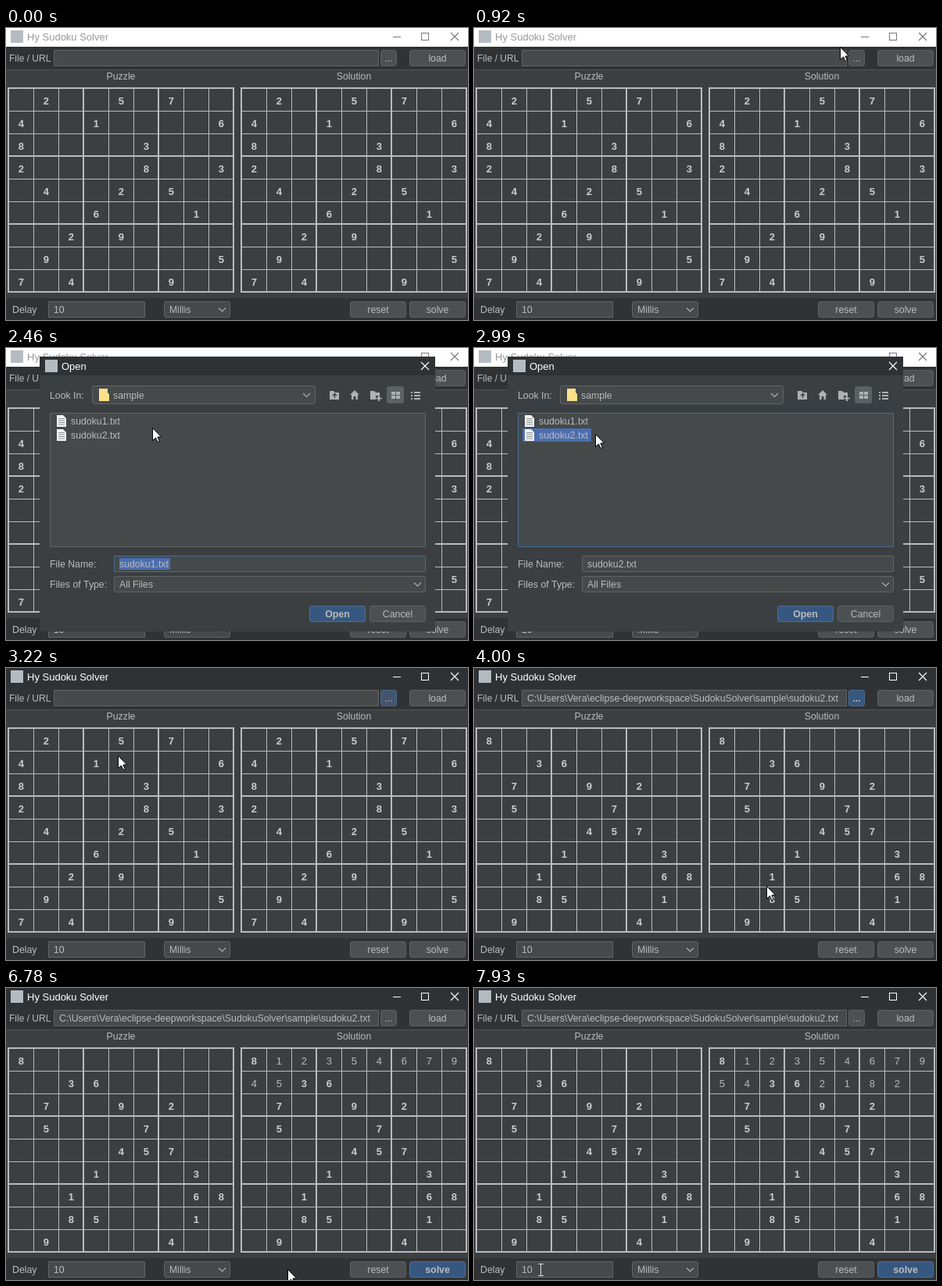
These frames come from a looping animation (591x374 px, 8000 ms). An HTML page with a canvas:

```html
<!DOCTYPE html>
<html lang="en">
<head>
<meta charset="utf-8">
<title>Sudoku solver</title>
<style>
html, body { margin: 0; width: 100%; height: 100%; overflow: hidden; background: #3c3f41; }
canvas { display: block; }
</style>
</head>
<body>
<canvas id="stage" width="591" height="374"></canvas>
<script>
const ctx = document.getElementById('stage').getContext('2d');
const LOOP = 8000;
const SANS = '"Liberation Sans", Arial, sans-serif';
const C = {
  bar: '#303234', panel: '#3c3f41', field: '#45494a', line: '#646464', text: '#bbbbbb',
  button: '#4c5052', edge: '#5e6060', hover: '#55595c', blue: '#365880', blueEdge: '#4c708c',
  focus: '#466d94', select: '#4b6eaf', icon: '#afb1b3', app: '#b4bcc2', title: '#2f3235'
};
const PATH = 'C:\\Users\\Vera\\eclipse-deepworkspace\\SudokuSolver\\sample\\sudoku2.txt';
const FIRST =
  '.2..5.7..' + '4..1....6' + '8....3...' + '2....8..3' + '.4..2.5..' +
  '...6...1.' + '..2.9....' + '.9......5' + '7.4...9..';
const SECOND =
  '8........' + '..36.....' + '.7..9.2..' + '.5...7...' + '....457..' +
  '...1...3.' + '..1....68' + '..85...1.' + '.9....4..';

// Key moments in ms
const T = { hover: 1150, press: 1380, open: 1700, pick: 2930, close: 3220, load: 3470,
            solveHover: 5550, solveFocus: 5700, solve: 5780, digits: 5930 };

// Cursor legs: start, end, steps, x, y, easing
const linear = f => f, easeIn = f => f * f, easeOut = f => f * (2 - f), smooth = f => f * f * (3 - 2 * f);
const LEGS = [
  [300, 300, 1, 398, 364, linear],
  [377, 685, 5, 438, 150, linear],
  [762, 916, 3, 468, 24, easeOut],
  [993, 1070, 2, 478, 35, linear],
  [1150, 1150, 1, 482, 36, linear],
  [2080, 2460, 6, 187, 102, smooth],
  [2630, 2780, 3, 169, 107, linear],
  [2930, 3070, 3, 143, 112, easeOut],
  [3470, 4000, 8, 374, 279, smooth],
  [4710, 4710, 1, 371, 280, linear],
  [5010, 5700, 10, 553, 356, smooth],
  [6325, 6710, 6, 420, 360, easeIn],
  [6780, 7550, 11, 76, 361, easeOut],
  [7630, 7780, 3, 85, 361, linear]
];

function cursorAt(t) {
  let x = 398, y = 364;
  for (const [t0, t1, n, tx, ty, ease] of LEGS) {
    if (t < t0) break;
    const k = n > 1 ? Math.floor((t - t0 + 0.5) * (n - 1) / (t1 - t0)) + 1 : 1;
    const f = ease(Math.min(1, k / n));
    x += (tx - x) * f;
    y += (ty - y) * f;
  }
  return [x, y];
}

// Board after each digit tried by the backtracking search
function trace(puzzle, limit) {
  const cells = [...puzzle], states = [puzzle];
  const fits = i => cells.every((v, j) => {
    if (j === i || v !== cells[i]) return true;
    const r = i / 9 | 0, c = i % 9, s = j / 9 | 0, d = j % 9;
    return r !== s && c !== d && ((r / 3 | 0) !== (s / 3 | 0) || (c / 3 | 0) !== (d / 3 | 0));
  });
  function search(i) {
    while (i < 81 && puzzle[i] !== '.') i++;
    if (i === 81) return true;
    for (let v = 1; v <= 9; v++) {
      cells[i] = String(v);
      states.push(cells.join(''));
      if (states.length > limit || (fits(i) && search(i + 1))) return true;
    }
    cells[i] = '.';
    return false;
  }
  search(0);
  return states;
}
const STATES = trace(SECOND, 104);

function solutionAt(t) {
  if (t < T.load) return FIRST;
  if (t < T.digits) return SECOND;
  const tick = 76.92;
  const shown = T.digits + Math.floor((t - T.digits + 1) / tick) * tick;
  return STATES[Math.min(104, Math.floor((shown - 5845) / 20))];
}

function rect(x, y, w, h, color) {
  ctx.fillStyle = color;
  ctx.fillRect(x, y, w, h);
}

function text(s, x, y, { size = 12.3, color = C.text, bold = false, align = 'left' } = {}) {
  ctx.font = (bold ? 'bold ' : '') + size + 'px ' + SANS;
  ctx.textAlign = align;
  ctx.fillStyle = color;
  ctx.fillText(s, x, y);
}

function stroke(color, width, ...lines) {
  ctx.strokeStyle = color;
  ctx.lineWidth = width;
  ctx.beginPath();
  for (const pts of lines)
    for (let i = 0; i < pts.length; i += 2) ctx[i ? 'lineTo' : 'moveTo'](pts[i], pts[i + 1]);
  ctx.stroke();
}

function polygon(color, ...pts) {
  ctx.fillStyle = color;
  ctx.beginPath();
  for (let i = 0; i < pts.length; i += 2) ctx.lineTo(pts[i], pts[i + 1]);
  ctx.closePath();
  ctx.fill();
}

function box(x, y, w, h, fill, edge, r = 0) {
  ctx.beginPath();
  ctx.roundRect(x + 0.5, y + 0.5, w - 1, h - 1, r);
  ctx.fillStyle = fill;
  ctx.fill();
  ctx.strokeStyle = edge;
  ctx.lineWidth = 1;
  ctx.stroke();
}

function button(label, x, y, w, { fill = C.button, edge = C.edge, bold = false } = {}) {
  box(x, y, w, 21, fill, edge, 2.5);
  text(label, x + w / 2, y + 15, { bold, align: 'center' });
}
const DEFAULT = { fill: C.blue, edge: C.blueEdge, bold: true };

function chevron(x, y) {
  stroke(C.icon, 1.1, [x - 4.5, y - 2, x, y + 2.5, x + 4.5, y - 2]);
}

function cross(x, y, color) {
  stroke(color, 1.1, [x - 5, y - 5, x + 5, y + 5], [x + 5, y - 5, x - 5, y + 5]);
}

function grid(x, cells) {
  for (let i = 0; i <= 9; i++) {
    const w = i % 3 ? 1 : 2;
    rect(x + 34 - 32 + 32 * i - w, 76, w, 263, C.text);
    rect(x, 78 + 29 * i - w, 290, w, C.text);
  }
  for (let i = 0; i < 81; i++) {
    if (cells[i] === '.') continue;
    const bold = SECOND[i] === cells[i] || cells === FIRST;
    text(cells[i], x + 17.3 + 32 * (i % 9), 98 + 29 * (i / 9 | 0),
      { size: 13, bold, align: 'center', color: bold ? '#cccccc' : C.text });
  }
}

function titleBar(t) {
  const active = (t >= T.press && t < T.open) || t >= T.close;
  const ink = active ? '#ffffff' : '#777777';
  rect(0, 0, 591, 24, active ? C.title : '#ffffff');
  rect(6, 3, 16, 16, C.app);
  text('Hy Sudoku Solver', 27, 16, { size: 13, color: active ? '#ffffff' : '#999999' });
  rect(495, 11, 10, 1, ink);
  ctx.strokeStyle = ink;
  ctx.lineWidth = 1;
  ctx.strokeRect(531.5, 6.5, 9, 9);
  cross(574, 11, ink);
}

function browseStyle(t) {
  if (t < T.hover) return {};
  if (t < T.press) return { fill: C.hover };
  if (t < T.open) return { fill: '#3f6594', edge: C.focus };
  if (t < T.load) return { fill: '#44546a', edge: C.focus };
  return t < T.solve ? DEFAULT : {};
}

function solveStyle(t) {
  if (t < T.solveHover) return {};
  if (t < T.solveFocus) return { fill: C.hover };
  return t < T.solve ? { fill: C.hover, edge: C.focus } : DEFAULT;
}

function mainWindow(t) {
  rect(0, 0, 591, 374, C.panel);
  titleBar(t);
  rect(0, 24, 591, 29, C.bar);
  rect(0, 53, 591, 1, '#505254');
  text('File / URL', 4, 43, { size: 12 });
  box(61, 28, 416, 21, C.field, C.line);
  if (t >= T.load) text(PATH, 68, 43);
  button('...', 479, 28, 21, browseStyle(t));
  button('load', 516, 28, 72);

  text('Puzzle', 147, 66, { align: 'center' });
  text('Solution', 445, 66, { align: 'center' });
  grid(2, t < T.load ? FIRST : SECOND);
  grid(300, solutionAt(t));

  rect(0, 346, 591, 28, C.bar);
  text('Delay', 8, 365);
  box(54, 350, 124, 21, C.field, C.line);
  text('10', 61, 365);
  box(202, 350, 85, 21, C.field, C.line, 2.5);
  text('Millis', 209, 365);
  chevron(276.5, 360.5);
  button('reset', 440, 350, 72);
  button('solve', 516, 350, 72, solveStyle(t));
}

function folder(x) {
  polygon(C.icon, x, 55, x + 5, 55, x + 7, 57, x + 12, 57, x + 12, 66, x, 66);
}

function fileRow(name, y, selected) {
  if (selected) rect(62, y - 1, 88, 17, C.select);
  polygon('#f2f2f2', 65, y, 73, y, 77, y + 4, 77, y + 15, 65, y + 15);
  for (let i = 0; i < 4; i++) rect(67, y + 4 + i * 2.5, 8, 1, '#8f9496');
  text(name, 83, y + 12);
}

function dialogIcons() {
  folder(414);
  stroke(C.panel, 1.4, [420.5, 64, 420.5, 59], [418, 61, 420.5, 58.5, 423, 61]);
  polygon(C.icon, 440, 60, 446, 54, 452, 60, 450, 60, 450, 66, 447.5, 66, 447.5, 62,
    444.5, 62, 444.5, 66, 442, 66, 442, 60);
  folder(466);
  rect(473, 61, 8, 7, C.panel);
  rect(476, 61, 2, 7, C.icon);
  rect(473.5, 63.5, 7, 2, C.icon);
  box(487, 49, 22, 22, '#5c6164', '#5c6164', 2.5);
  for (let i = 0; i < 4; i++) rect(493 + (i % 2) * 6, 56 + (i >> 1) * 5, 5, 4, C.icon);
  for (let i = 0; i < 3; i++) {
    rect(518, 56 + i * 4, 2, 2, C.icon);
    rect(522, 56 + i * 4, 8, 2, C.icon);
  }
}

function dialog(t) {
  const picked = t >= T.pick;
  rect(43, 11, 506, 352, C.panel);
  rect(43, 11, 506, 24, C.title);
  rect(50, 15, 16, 16, C.app);
  text('Open', 71, 28, { size: 13, color: '#ffffff' });
  cross(536, 23, '#ffffff');

  text('Look In:', 56, 65);
  box(110, 48, 286, 24, C.field, C.line, 2.5);
  polygon('#ffe08a', 119, 52, 130, 52, 130, 57, 132, 59, 132, 68, 119, 68);
  text('sample', 137, 65);
  chevron(384.5, 60);
  dialogIcons();

  box(56, 83, 481, 172, C.field, picked ? C.focus : C.line);
  fileRow('sudoku1.txt', 86, false);
  fileRow('sudoku2.txt', 104, picked);

  text('File Name:', 56, 281);
  box(138, 266, 399, 21, C.field, picked ? C.line : C.focus);
  if (!picked) {
    rect(145, 269, 65, 15, C.select);
    if (t < 2230 || t >= 2700) rect(209, 269, 1, 15, C.text);
  }
  text(picked ? 'sudoku2.txt' : 'sudoku1.txt', 145, 281);
  text('Files of Type:', 56, 307);
  box(138, 292, 399, 21, C.field, C.line, 2.5);
  text('All Files', 145, 307);
  chevron(526.5, 302.5);
  button('Open', 388, 330, 72, DEFAULT);
  button('Cancel', 465, 330, 72);
}

function pointer(t) {
  if (t < 300) return;
  const [x, y] = cursorAt(t).map(Math.round);
  const clicking = (t >= T.press && t < T.open) || (t >= 3000 && t < T.close) ||
    (t >= T.solve && t < T.digits);
  if (clicking) {
    ctx.fillStyle = 'rgba(222, 205, 20, 0.65)';
    ctx.beginPath();
    ctx.arc(x - 1, y, 12, 0, Math.PI * 2);
    ctx.fill();
  }
  if (t > 7000 && x < 178) {
    const beam = [[x - 3, y - 7.5, x + 4, y - 7.5], [x + 0.5, y - 7.5, x + 0.5, y + 7.5],
                  [x - 3, y + 7.5, x + 4, y + 7.5]];
    stroke('#e0e0e0', 1, ...beam);
    return;
  }
  ctx.save();
  ctx.translate(x + 0.5, y + 0.5);
  ctx.beginPath();
  for (const [px, py] of [[0, 0], [0, 16], [4, 12.5], [6.5, 18], [8.8, 17], [6.4, 11.6], [11, 11.3]])
    ctx.lineTo(px, py);
  ctx.closePath();
  ctx.fillStyle = '#ffffff';
  ctx.fill();
  ctx.strokeStyle = '#000000';
  ctx.lineWidth = 1;
  ctx.stroke();
  ctx.restore();
}

function frame() {
  const t = performance.now() % LOOP;
  mainWindow(t);
  if (t >= T.open && t < T.close) dialog(t);
  pointer(t);
  requestAnimationFrame(frame);
}
frame();
</script>
</body>
</html>
```
